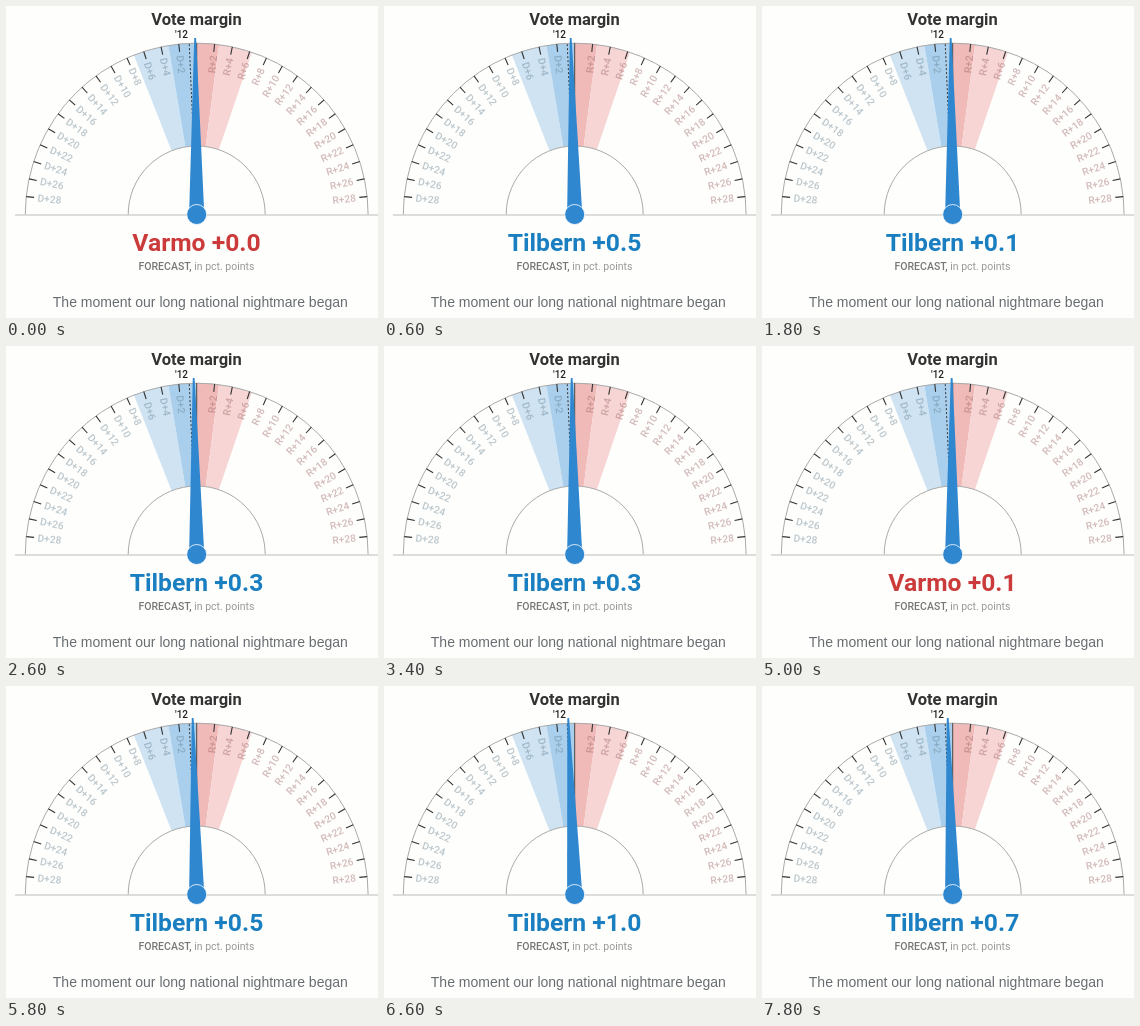
Write an HTML page that moves like this. It is 372x312 px and loops after 8 s.

```html
<!DOCTYPE html>
<html lang="en">
<head>
<meta charset="utf-8">
<title>Vote margin</title>
<style>
  html, body { margin: 0; width: 100%; height: 100%; overflow: hidden; background: #fefefc; }
  svg { display: block; width: 372px; height: 312px; }
  text { font-family: Roboto, "Open Sans", sans-serif; }
  .mid { text-anchor: middle; }
  .title { font-size: 16.5px; font-weight: 700; fill: #333; }
  .result { font-size: 24.7px; font-weight: 700; }
  .note { font-size: 10.5px; fill: #999; }
  .note tspan { font-weight: 500; fill: #777; }
  .caption { font-family: "Liberation Sans", Arial, sans-serif; font-size: 14px; fill: #686d72; }
  .mark { font-size: 10px; font-weight: 500; fill: #222; }
  .label { font-size: 10.2px; font-weight: 500; }
  .arc { fill: none; stroke: #aaa; }
  .tick { stroke: #333; stroke-width: 1.1; }
</style>
</head>
<body>
<svg viewBox="0 0 372 312">
  <g id="dial"></g>
  <g id="needle">
    <path d="M183.1 208.5 L189.8 32 L191.6 32 L198.3 208.5 Z" fill="#2f87d0"/>
  </g>
  <circle cx="190.7" cy="208.5" r="10" fill="#2f87d0" stroke="#fff" stroke-opacity=".8"/>
  <text class="mid title" x="190.5" y="19">Vote margin</text>
  <text class="mid mark" x="175.5" y="32">'12</text>
  <text class="mid result" id="result" x="190.5" y="245"></text>
  <text class="mid note" x="190.5" y="264"><tspan>FORECAST,</tspan> in pct. points</text>
  <text class="mid caption" x="194.3" y="301">The moment our long national nightmare began</text>
</svg>
<script>
const CX = 190.7, CY = 208.5, OUTER = 171.4, INNER = 68.5;
const LOOP = 8000, STEP = 200;
const DEG_PER_POINT = 3;
const dial = document.getElementById('dial');
const needle = document.getElementById('needle');
const result = document.getElementById('result');

function add(tag, attrs, text = '') {
  const node = document.createElementNS('http://www.w3.org/2000/svg', tag);
  for (const key in attrs) node.setAttribute(key, attrs[key]);
  node.textContent = text;
  return dial.appendChild(node);
}

// Angles are degrees clockwise from straight up.
function polar(deg, radius) {
  const a = deg * Math.PI / 180;
  return [CX + radius * Math.sin(a), CY - radius * Math.cos(a)];
}

function wedge(from, to, fill) {
  add('path', {
    fill,
    d: `M${polar(from, OUTER)} A${OUTER} ${OUTER} 0 0 1 ${polar(to, OUTER)}` +
       `L${polar(to, INNER)} A${INNER} ${INNER} 0 0 0 ${polar(from, INNER)}Z`
  });
}

function spoke(deg, r1, r2, attrs) {
  const [x1, y1] = polar(deg, r1), [x2, y2] = polar(deg, r2);
  add('line', { x1, y1, x2, y2, ...attrs });
}

function label(points) {
  const right = points > 0, deg = points * DEG_PER_POINT;
  const [x, y] = polar(deg, 160);
  add('text', {
    class: 'label',
    x, y, dy: '.36em',
    'text-anchor': right ? 'end' : 'start',
    fill: right ? 'rgba(150,95,95,.42)' : 'rgba(95,125,140,.42)',
    transform: `rotate(${deg + (right ? -90 : 90)} ${x} ${y})`
  }, `${right ? 'R' : 'D'}+${Math.abs(points)}`);
}

wedge(-21.5, -9.5, '#cfe3f3');
wedge(-9.5, 0, '#a9cfec');
wedge(0, 7.5, '#f0bab9');
wedge(7.5, 18.8, '#f6d5d4');
for (const r of [OUTER, INNER]) {
  add('path', { class: 'arc', d: `M${CX - r} ${CY} A${r} ${r} 0 0 1 ${CX + r} ${CY}` });
}
add('path', { class: 'arc', d: `M9 ${CY + .5} H372`, style: 'stroke:#bbb' });
for (let p = 2; p <= 28; p += 2) {
  for (const points of [-p, p]) {
    spoke(points * DEG_PER_POINT, 163.5, OUTER, { class: 'tick' });
    label(points);
  }
}
spoke(0, INNER, OUTER, { stroke: '#444' });
spoke(-2.5, INNER, OUTER, { stroke: '#333', 'stroke-dasharray': '2 2' });

// [time, margin]; negative margins lean left.
const margins = [
  [0, 0], [600, -.5], [1800, -.1], [3400, -.3], [5000, .1], [6600, -1], [7800, -.7], [8000, -.6]
];

function marginAt(time) {
  const i = margins.findIndex(([t]) => t > time);
  const [t0, m0] = margins[i - 1], [t1, m1] = margins[i];
  const u = (time - t0) / (t1 - t0);
  const ease = (1 - Math.cos(Math.PI * u)) / 2;
  return m0 + (m1 - m0) * ease + .08 * Math.sin(Math.PI * 3 * u);
}

function draw(now) {
  const time = Math.floor((now % LOOP) / STEP) * STEP;
  const margin = Math.round(marginAt(time) * 10) / 10;
  const left = margin < 0;
  needle.setAttribute('transform', `rotate(${margin * 1.6 - .5} ${CX} ${CY})`);
  result.textContent = `${left ? 'Tilbern' : 'Varmo'} +${Math.abs(margin).toFixed(1)}`;
  result.setAttribute('fill', left ? '#1a7fc1' : '#cb3b3b');
}

const start = performance.now();
function tick() {
  draw(performance.now() - start);
  requestAnimationFrame(tick);
}
tick();
</script>
</body>
</html>
```
